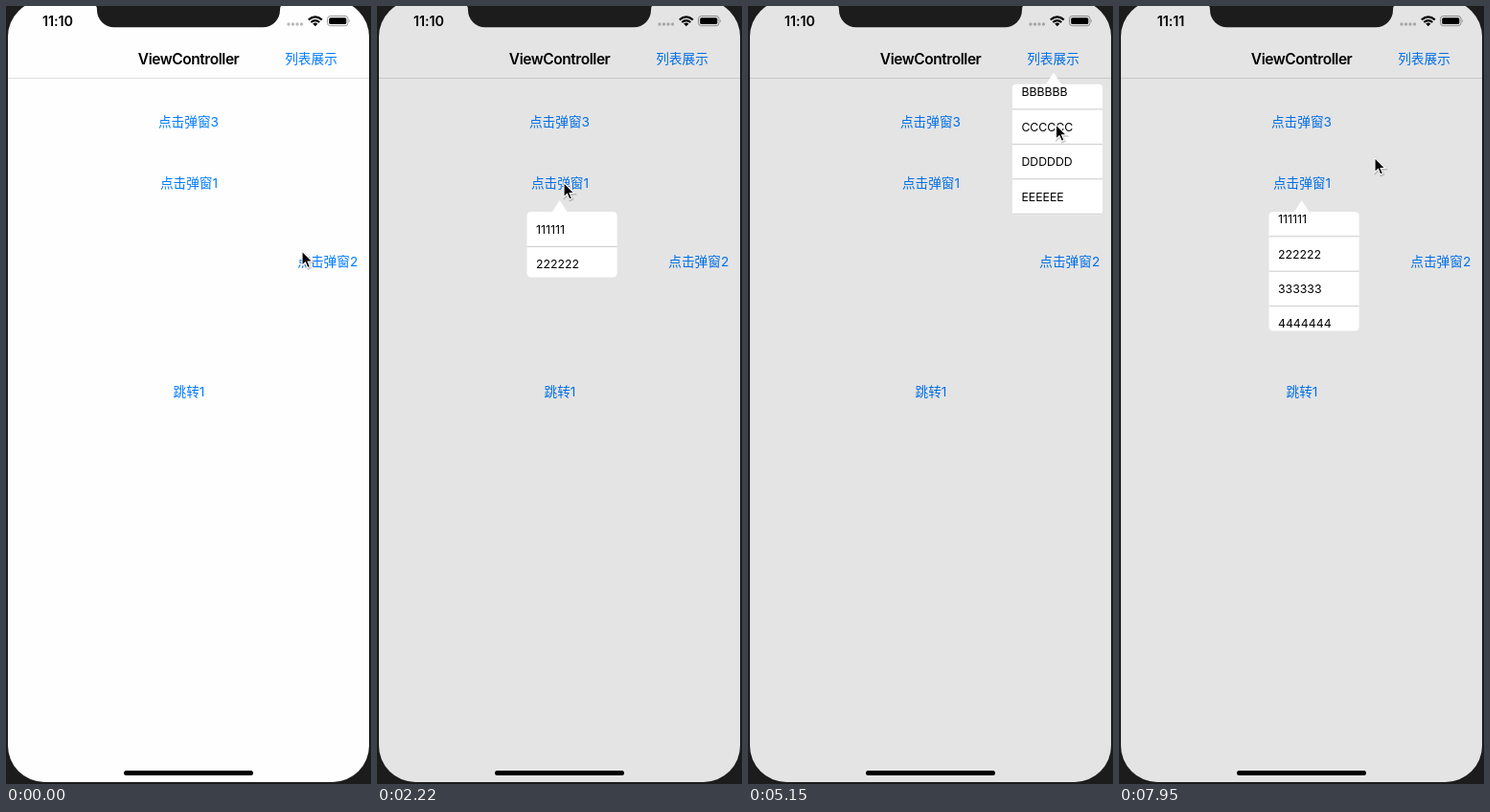
An HTML page that plays this animation: 381x813 px, repeating every 8 s.

```html
<!DOCTYPE html>
<html lang="zh">
<head>
<meta charset="utf-8">
<style>
  html, body { margin: 0; width: 100%; height: 100%; overflow: hidden; background: #1c1c1d; }
  svg { display: block; width: 100vw; height: 100vh; }
  text { font-family: Inter, "Noto Sans CJK SC", "Noto Sans CJK", sans-serif; }
  .btn { font-size: 13.67px; fill: #007aff; text-anchor: middle; }
  .bold { font-weight: 600; text-anchor: middle; }
  .row { font-size: 12.3px; }
</style>
</head>
<body>
<svg viewBox="0 0 381 813">
  <defs>
    <clipPath id="screen"><rect x="2" y="-6" width="377" height="817" rx="38"/></clipPath>
    <clipPath id="frame"><rect id="mask" width="94.5"/></clipPath>
  </defs>
  <rect width="381" height="813" fill="#1c1c1d"/>
  <g clip-path="url(#screen)">
    <rect width="381" height="813" fill="#fefefe"/>
    <rect y="75" width="381" height="1" fill="#dedede"/>
    <text id="clock" class="bold" x="54" y="21" font-size="14.4" letter-spacing="-.1"></text>
    <g fill="#b9b9b9">
      <circle cx="295" cy="19" r="1.7"/><circle cx="299.5" cy="19" r="1.7"/>
      <circle cx="304" cy="19" r="1.7"/><circle cx="308.5" cy="19" r="1.7"/>
    </g>
    <g fill="none" stroke="#000" stroke-width="2.1">
      <path d="M315.8 14.4Q322.8 8.2 329.8 14.4M318.3 17Q322.8 13.2 327.3 17"/>
    </g>
    <path d="M320.2 18.6Q322.8 16.6 325.4 18.6L322.8 21.2Z"/>
    <rect x="335.5" y="10.5" width="21.5" height="10.2" rx="3" fill="none" stroke="#999"/>
    <rect x="337.2" y="12.2" width="18.1" height="6.8" rx="1.6"/>
    <path d="M358.2 13.8Q360 15.6 358.2 17.4Z" fill="#999"/>
    <text class="bold" x="190.6" y="60.5" font-size="15.5" letter-spacing="-.45">ViewController</text>
    <text class="btn" id="list" x="318.5" y="60">列表展示</text>
    <text class="btn" x="190.5" y="126">点击弹窗3</text>
    <text class="btn" id="one" x="191" y="189.5">点击弹窗1</text>
    <text class="btn" id="two" x="335.8" y="271.5">点击弹窗2</text>
    <text class="btn" x="191" y="408">跳转1</text>
    <rect id="dim" width="381" height="813" fill-opacity=".103"/>
    <g id="popup">
      <path id="arrow" d="M-8 .5L0 -12L8 .5Z" fill="#fff"/>
      <g clip-path="url(#frame)">
        <rect width="94.5" height="137" fill="#fff"/>
        <g id="rows"></g>
      </g>
    </g>
    <rect x="123" y="799" width="135" height="5" rx="2.5"/>
  </g>
  <path d="M94 0H287Q286 1 286 4A18 18 0 0 1 268 22.3H113A18 18 0 0 1 95 4Q95 1 94 0Z" fill="#1c1c1d"/>
  <g id="cursor">
    <path d="M0 0V15.2L3.5 12L5.9 17.6L8.5 16.5L6.1 11H10.9Z" transform="translate(.6 1)" opacity=".2" stroke="#000" stroke-width="2"/>
    <path d="M0 0V15.2L3.5 12L5.9 17.6L8.5 16.5L6.1 11H10.9Z" stroke="#fff" stroke-width="1.1"/>
  </g>
</svg>
<script>
const $ = id => document.getElementById(id);
const LOOP = 8000, STEP = 146.9, FULL = 137, ROW = 36.45;

const digits = [..."12345678"].map(c => c.repeat(c < "4" ? 6 : 7));
const letters = [..."ABCDEFGH"].map(c => c.repeat(6));

const popups = [
  { btn: "two", press: 1, open: 2, close: 6.49, x: 275.7, y: 297, tip: 335.5, rows: letters },
  { btn: "one", press: 13, open: 14, close: 20.38, x: 156.3, y: 215, tip: 190.7, rows: digits },
  { btn: "list", press: 26, open: 27, close: 40.18, x: 275.7, y: 81.5, tip: 319, rows: letters,
    scroll: [[31, 0], [34, 62], [37, 0]] },
  { btn: "one", press: 48, open: 49, close: 53.61, x: 156.3, y: 215, tip: 190.7, rows: digits,
    scroll: [[51, 0], [52, 10.7]] }
];
const path = [
  [5, 309, 256], [7, 285, 199], [8, 285, 199], [12, 195, 184.5], [17, 195, 184.5],
  [20, 244.5, 163.5], [22, 244.5, 163.5], [26, 316.5, 56], [28, 316.5, 56],
  [31, 322, 160], [34, 322, 110], [37, 320, 165], [40, 226, 136.5], [42, 226, 136.5],
  [47, 193, 185], [50, 193, 185], [51, 215, 235], [53, 267, 158.5]
];

const clamp = v => Math.min(1, Math.max(0, v));
const ease = v => (1 - Math.cos(Math.PI * clamp(v))) / 2;

function along(keys, s) {
  const i = keys.findIndex(k => k[0] > s);
  if (i < 1) return (i ? keys[keys.length - 1] : keys[0]).slice(1);
  const a = keys[i - 1], b = keys[i], p = ease((s - a[0]) / (b[0] - a[0]));
  return a.slice(1).map((v, n) => v + (b[n + 1] - v) * p);
}

function fillRows(list) {
  $("rows").innerHTML = list.map((label, i) =>
    `<text class="row" x="9.7" y="${i * ROW + 22.8}">${label}</text>` +
    `<rect y="${(i + 1) * ROW - .5}" width="94.5" height="1" fill="#cbcbcb"/>`).join("");
}

let shown;
function draw(t) {
  const s = Math.floor(t / STEP);
  const p = popups.find(q => s >= q.open && s < q.close + 2);
  const show = p ? "visible" : "hidden";
  $("dim").setAttribute("visibility", show);
  $("popup").setAttribute("visibility", show);
  if (p) {
    if (shown !== p) fillRows((shown = p).rows);
    const h = FULL * (ease((s - p.open) / 2) - ease((s - p.close) / 2));
    $("popup").setAttribute("transform", `translate(${p.x} ${p.y})`);
    $("arrow").setAttribute("transform", `translate(${p.tip - p.x} 0)`);
    $("mask").setAttribute("height", h);
    $("mask").setAttribute("rx", Math.min(4.5, h / 2));
    $("rows").setAttribute("transform", `translate(0 ${p.scroll ? -along(p.scroll, s)[0] : 0})`);
  }
  for (const id of ["one", "two", "list"]) {
    const hit = popups.find(q => q.btn === id && s >= q.press && s <= q.open);
    $(id).setAttribute("opacity", hit ? (s < hit.open ? .2 : .27) : 1);
  }
  $("clock").textContent = s < 52 ? "11:10" : "11:11";
  $("cursor").setAttribute("transform", `translate(${along(path, s).join(" ")})`);
}

const start = performance.now();
function tick() {
  draw((performance.now() - start) % LOOP);
  requestAnimationFrame(tick);
}
tick();
</script>
</body>
</html>
```
